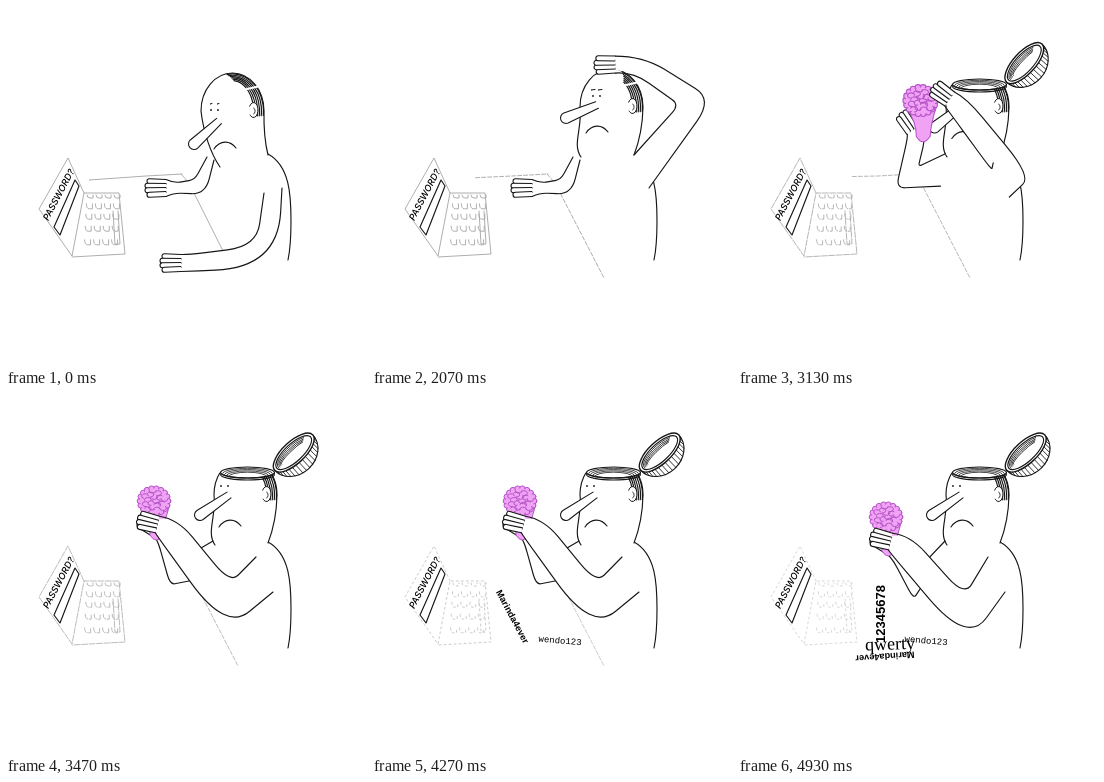
Write an HTML page with a canvas that moves like this. It is 360x360 px and loops after 5 s.

```html
<!DOCTYPE html>
<html lang="en">
<head>
<meta charset="utf-8">
<title>Forgotten password</title>
<style>
html, body { margin: 0; width: 100%; height: 100%; overflow: hidden; background: #fff; }
canvas { display: block; width: 360px; height: 360px; }
</style>
</head>
<body>
<canvas id="stage"></canvas>
<script>
const LOOP = 5000, STEP = 1000 / 15, INK = '#161616', TAU = Math.PI * 2;
const canvas = document.getElementById('stage');
const ctx = canvas.getContext('2d');
const ratio = window.devicePixelRatio || 1;
canvas.width = canvas.height = 360 * ratio;

const clamp = v => Math.max(0, Math.min(1, v));
const smooth = u => u * u * (3 - 2 * u);
const linear = u => u;
const mix = (a, b, u) => a.map((v, i) => v + (b[i] - v) * u);

// Small vector helpers on [x, y].
const add = (a, b, k = 1) => [a[0] + b[0] * k, a[1] + b[1] * k];
const sub = (a, b) => add(a, b, -1);
const dot = (a, b) => a[0] * b[0] + a[1] * b[1];
const unit = a => { const l = Math.hypot(...a) || 1; return [a[0] / l, a[1] / l]; };
const towards = (a, side) => dot(a, side) < 0 ? [-a[0], -a[1]] : a;
const normal = a => [a[1], -a[0]];

// Value of a keyed list [[time, numbers], ...] at time t.
function keyed(keys, t, ease = smooth) {
  if (t <= keys[0][0]) return keys[0][1];
  for (let i = 1; i < keys.length; i++) {
    const [t0, a] = keys[i - 1], [t1, b] = keys[i];
    if (t < t1) return mix(a, b, ease((t - t0) / (t1 - t0)));
  }
  return keys[keys.length - 1][1];
}

function paint(build, { color = INK, width = 1.15, fill } = {}) {
  ctx.beginPath();
  build();
  if (fill) { ctx.fillStyle = fill; ctx.fill(); }
  if (!color) return;
  ctx.strokeStyle = color;
  ctx.lineWidth = width;
  ctx.stroke();
}

const line = (points, style) => paint(() => points.forEach(p => ctx.lineTo(...p)), style);
const oval = (x, y, rx, ry, style, from = 0, to = TAU) =>
  paint(() => ctx.ellipse(x, y, rx, ry, 0, from, to), style);

// Open-ended rounded shape used for fingers and the nose.
function capsule(root, tip, r0, r1) {
  const n = normal(unit(sub(tip, root))), a = Math.atan2(tip[1] - root[1], tip[0] - root[0]);
  paint(() => {
    ctx.moveTo(...add(root, n, r0));
    ctx.arc(...tip, r1, a - Math.PI / 2, a + Math.PI / 2);
    ctx.lineTo(...add(root, n, -r0));
  }, { fill: '#fff', width: 1.1 });
}

function label(text, font, x, y, deg) {
  ctx.save();
  ctx.translate(x, y);
  ctx.rotate(deg * Math.PI / 180);
  ctx.font = font;
  ctx.textAlign = 'center';
  ctx.textBaseline = 'middle';
  ctx.fillStyle = '#000';
  ctx.fillText(text, 0, 0);
  ctx.restore();
}

// Arm pose: finger tips, wrist, elbow, half width, softness of the bend, both shoulder ends.
const pose = (tip, wrist, elbow, width, bend, inner, outer) =>
  [...tip, ...wrist, ...elbow, width, bend, ...inner, ...outer];
const RIGHT = {
  table: pose([157, 257], [182, 257], [261, 251], 15, 0.7, [258, 187], [276, 182]),
  scalp: pose([225, 59], [266, 58], [324, 96], 17, 0.25, [262, 149], [277, 182]),
  lid: pose([278, 26], [295, 54], [340, 108], 15, 0.25, [262, 149], [277, 182]),
  brain: pose([134, 126], [161, 133], [222, 213], 24, 0.5, [250, 163], [267, 198])
};
const LEFT = {
  table: pose([142, 182], [168, 182], [194, 181], 9, 0.45, [201, 151], [208, 154]),
  brow: pose([212, 82], [212, 111], [168, 161], 18, 0.2, [208, 149], [225, 171]),
  brain: pose([136, 125], [158, 140], [170, 178], 14, 0.2, [207, 147], [188, 186])
};

function arm(p, curl = 0) {
  const [tip, wrist, elbow, [width, bend], inner, outer] =
    [0, 2, 4, 6, 8, 10].map(i => p.slice(i, i + 2));
  const up = unit(sub(wrist, elbow)), shoulder = mix(inner, outer, 0.5);
  const out = unit(add([0, 0], add(up, unit(sub(shoulder, elbow))), -1));
  const across = towards(normal(up), out);
  const edge = (side, end, f) => {
    const start = add(wrist, across, side * width * 0.55), corner = add(elbow, out, side * width);
    return { start, corner, end, a: mix(corner, start, f), b: mix(corner, end, f) };
  };
  const e1 = edge(1, outer, bend), e0 = edge(-1, inner, bend * 0.6);

  const dir = unit(sub(tip, wrist)), fan = towards(normal(dir), out);
  const length = Math.min(18, Math.hypot(...sub(tip, wrist)) * 0.75);
  const fingers = [-1.5, -0.5, 0.5, 1.5].map(k => {
    const end = add(add(tip, fan, k * 4.5), dir, 1.5 - Math.abs(k) * 2 - curl * (5 + k));
    return [add(add(tip, fan, k * 4), dir, -length), end];
  });
  const first = fingers[0][0], last = fingers[3][0];

  paint(() => {
    ctx.moveTo(...first);
    ctx.lineTo(...e0.start);
    ctx.lineTo(...e0.a);
    ctx.quadraticCurveTo(...e0.corner, ...e0.b);
    ctx.lineTo(...inner);
    ctx.lineTo(...outer);
    ctx.lineTo(...e1.b);
    ctx.quadraticCurveTo(...e1.corner, ...e1.a);
    ctx.lineTo(...e1.start);
    ctx.lineTo(...last);
  }, { color: null, fill: '#fff' });
  for (const [e, base] of [[e0, first], [e1, last]]) paint(() => {
    ctx.moveTo(...add(base, fan, e === e0 ? -2.5 : 2.5));
    ctx.quadraticCurveTo(...e.start, ...mix(e.start, e.a, 0.4));
    ctx.lineTo(...e.a);
    ctx.quadraticCurveTo(...e.corner, ...e.b);
    ctx.lineTo(...e.end);
  });
  fingers.forEach(([a, b]) => capsule(a, b, 2.5, 2.5));
}

// Moves the hand and the elbow of a pose.
const nudge = (p, hand, elbow) => [...add(p, hand), ...add(p.slice(2), hand),
  ...add(p.slice(4), elbow), ...p.slice(6)];

const SHAKE_AT = 3400;
const shake = t => t < SHAKE_AT ? 0 : 0.5 - 0.5 * Math.cos(TAU * (t - 52 * STEP) / (4 * STEP));

function rightArm(t) {
  const p = keyed([[1470, RIGHT.table], [1870, RIGHT.scalp], [2390, RIGHT.scalp],
    [2600, RIGHT.lid], [2900, RIGHT.lid], [3330, RIGHT.brain]], t);
  const scratch = t > 1870 && t < 2390 ? Math.sin(TAU * (t - 31 * STEP) / 260) : 0;
  const s = shake(t);
  return nudge(p, [scratch * 2 + s, s * 17], [scratch * 7 + s * 6, s * 13]);
}

function leftArm(t) {
  const p = keyed([[2330, LEFT.table], [2600, LEFT.brow], [2870, LEFT.brow],
    [3330, LEFT.brain]], t);
  const s = shake(t);
  return nudge(p, [s, s * 17], [s * 7, s * 13]);
}

function desk(t) {
  const g = Math.round(165 + 47 * clamp((t - 2700) / 2230));
  const grey = { color: `rgb(${g},${g},${g})`, width: 0.9 };
  ctx.setLineDash(t > 3800 ? [2, 3] : t > 2600 ? [6, 1.5] : []);
  line([[78, 187], [62, 152], [33, 203], [66, 250], [78, 187], [113, 187], [119, 248], [66, 251]], grey);
  for (let row = 0; row < 5; row++) for (let col = 0; col < 4; col++) {
    const x = 81 + col * 9 - row * 0.6, y = 189 + row * 8 + row * row * 0.8, h = row ? 5 : 3;
    paint(() => {
      ctx.moveTo(x, y);
      ctx.quadraticCurveTo(x, y + h, x + 3, y + h);
      ctx.lineTo(x + 6, y + h);
      ctx.lineTo(x + 6, y);
    }, grey);
  }
  line([[107, 205], [109, 238], [114, 238], [112, 205]], grey);
  ctx.setLineDash(t > 1700 ? [4, 2] : []);
  if (t < 3380) line([[83 + t / 100, 174 - t / 900], [140, 170], [176, 168]], grey);
  if (t < 4700) line([[175, 168], [183, 177], t < 1470 ? [217, 245] : [232, 272]], grey);
  ctx.setLineDash([]);

  line([[48, 221], [69, 174], [73, 180], [54, 229], [48, 221]]);
  label('PASSWORD?', 'italic 500 9.1px Inter, sans-serif', 53, 189, -62);
}

// Face pose: nose root, nose tip, mouth, eyes.
const FACES = {
  sad: [213, 115, 188, 138, 219, 140, 205, 104],
  up: [225, 99, 194, 112, 225, 124, 221, 90],
  down: [224, 95, 217, 126, 232, 125, 221, 90],
  open: [223, 101, 194, 121, 224, 130, 215, 92]
};
const OPEN_AT = 2420, RIM = { x: 241.5, y: 78.5, rx: 27, ry: 5.5 };

function head(t) {
  const lift = smooth(clamp((t - 1470) / 260));
  const open = t >= OPEN_AT;
  const cx = 226.5 + 13 * lift, cy = 105 - 4 * lift;
  const chin = mix([214, 161], [209, 151], lift);

  ctx.save();
  if (open) {
    ctx.beginPath();
    ctx.rect(0, RIM.y, 360, 360);
    ctx.clip();
  }
  paint(() => {
    ctx.moveTo(...chin);
    ctx.bezierCurveTo(chin[0] - 9, chin[1] - 13, cx - 29, cy + 22, cx - 31.5, cy);
    ctx.ellipse(cx, cy, 31.5, 38, 0, Math.PI, TAU);
    ctx.quadraticCurveTo(cx + 31, cy + 26, 262, 149);
  }, { fill: '#fff' });
  const part = -1.75 + 0.55 * lift;
  for (let k = 0; k < 6; k++) {
    oval(cx, cy, 31 - k * 2, 37 - k * 1.3, { width: 1.2 }, part + k * 0.05, 0.12 + k * 0.01);
  }
  line([[cx + 10, cy - 21], [cx + 28, cy - 25]], { color: '#fff', width: 2 });
  oval(cx + 21, cy - 1, 4.5, 7.5, { width: 1, fill: '#fff' }, -2.6, 2.4);
  oval(cx + 21, cy, 1.6, 3, { width: 0.8 }, -1.5, 1.5);
  ctx.restore();

  if (open) crown(t);
  const f = keyed([[1470, FACES.sad], [1730, FACES.up], [2390, FACES.up], [2600, FACES.down],
    [2870, FACES.down], [3200, FACES.open]], t);
  const [nose, tip, [mx, my], [ex, ey]] = [0, 2, 4, 6].map(i => f.slice(i, i + 2));
  if (t < 2520 || t > 3000) for (const x of [ex, ex + 7]) {
    oval(x, ey, 0.9, 1, { color: null, fill: INK });
    if (!open) line([[x - 1 - lift, ey - 6], [x + 1 + lift, ey - 6.5]], { width: 1 });
  }
  paint(() => {
    ctx.moveTo(mx - 11, my + 3);
    ctx.bezierCurveTo(mx - 5, my - 6, mx + 5, my - 6, mx + 11, my + 2);
  });
  capsule(nose, tip, 3.5, 5.5);
}

function crown(t) {
  lid(t);
  const { x, y, rx, ry } = RIM;
  oval(x, y, rx, ry, { fill: '#fff' });
  for (let k = 1; k < 5; k++) oval(x, y + k, rx - k * 2, ry - k * 0.3, { width: 0.8 }, Math.PI, TAU);
  if (t < 2900) {
    ctx.save();
    ctx.beginPath();
    ctx.rect(x - rx, 40, rx * 2, y - 40);
    ctx.ellipse(x, y, rx, ry, 0, 0, Math.PI);
    ctx.clip();
    brain(243, 82, 1.22, 0.95);
    ctx.restore();
  }
  for (const dy of [0, 2]) oval(x, y + dy, rx, ry, {}, 0, Math.PI);
}

// Skull cap hinged at the back of the head; +y is the dome side.
function lid(t) {
  const [deg] = keyed([[OPEN_AT, [-180]], [2600, [-84]], [2870, [-84]], [3200, [-43]]], t);
  ctx.save();
  ctx.translate(268, 77);
  ctx.rotate(deg * Math.PI / 180);
  ctx.translate(27, 0);
  oval(0, 0, 26, 22, { fill: '#fff' }, 0, Math.PI);
  for (let a = 0.15; a < 3; a += 0.17) {
    const c = 26 * Math.cos(a), s = Math.sin(a);
    line([[c, 22 * s], [c * 0.98, 10 * s]], { width: 0.8 });
  }
  oval(0, 0, 26, 11, { fill: '#fff', width: 1.4 });
  oval(0, 0, 23, 8.8);
  for (let k = 1; k < 5; k++) oval(0, 0, 23 - k * 1.5, 8.8 - k * 1.5, { width: 0.8 }, Math.PI * 0.95, TAU * 0.9);
  ctx.restore();
}

function seeded(seed) {
  return () => (seed = seed * 16807 % 2147483647) / 2147483647;
}

// Scalloped lump on a stem, filled with curled folds.
function brain(x, y, sx, sy) {
  const pink = '#f0a2f5', fold = { color: '#b653c8', width: 1 };
  const random = seeded(11);
  ctx.save();
  ctx.translate(x, y);
  ctx.scale(sx, sy);
  paint(() => {
    ctx.moveTo(-13, 8);
    ctx.quadraticCurveTo(-4, 20, -4, 34);
    ctx.quadraticCurveTo(2, 44, 9, 34);
    ctx.quadraticCurveTo(10, 20, 15, 6);
  }, { ...fold, fill: pink });
  for (let a = 0; a < TAU; a += TAU / 18) {
    oval(14 * Math.cos(a), 12.5 * Math.sin(a), 2.8, 2.8, { ...fold, fill: pink });
  }
  oval(0, 0, 14, 12.5, { color: null, fill: pink });
  for (let i = 0; i < 17; i++) {
    const r = Math.sqrt((i + 0.5) / 17), a = i * 2.4, turn = random() * TAU;
    oval(12 * r * Math.cos(a), 11 * r * Math.sin(a), 3.4, 2.5, fold, turn, turn + 3 + random() * 1.5);
  }
  ctx.restore();
}

// Keys: time, [x, y, degrees] of the middle of the word.
const WORDS = [
  ['wendo123', '9px "Liberation Mono", monospace',
    [[3600, [150, 145, -60]], [3870, [175, 222, -10]], [4070, [188, 247, 5]]]],
  ['Marinda4ever', 'bold 9.2px "Liberation Sans", sans-serif',
    [[3930, [150, 145, -20]], [4267, [140, 223, 62]], [4530, [147, 262, 176]]]],
  ['qwerty', '18px "Liberation Serif", serif',
    [[4340, [150, 150, 60]], [4730, [152, 251, -2]]]],
  ['12345678', 'bold 13px "Liberation Sans", sans-serif',
    [[4600, [150, 150, -30]], [4930, [143, 220, -90]]]]
];

function draw(t) {
  ctx.setTransform(ratio, 0, 0, ratio, 0, 0);
  ctx.fillStyle = '#fff';
  ctx.fillRect(0, 0, 360, 360);
  ctx.lineCap = ctx.lineJoin = 'round';

  desk(t);
  paint(() => {
    ctx.moveTo(262, 148);
    ctx.bezierCurveTo(284, 160, 285, 190, 285, 215);
    ctx.quadraticCurveTo(285, 240, 282, 254);
  });
  head(t);
  arm(leftArm(t));
  for (const [text, font, keys] of WORDS) {
    if (t >= keys[0][0]) label(text, font, ...keyed(keys, t, linear));
  }
  if (t >= 2900) {
    const [x, y, s] = keyed([[2900, [240, 74, 1.15]], [3300, [148, 107, 1]]], t);
    brain(x, y + 16 * shake(t), s, s);
  }
  const curl = t < 1400 ? 0.5 - 0.5 * Math.cos(TAU * t / 480) : 0;
  arm(rightArm(t), curl);
}

function tick(now) {
  draw(Math.floor((now % LOOP + 5) / STEP) % 75 * STEP);
  requestAnimationFrame(tick);
}
draw(0);
requestAnimationFrame(tick);
</script>
</body>
</html>
```
